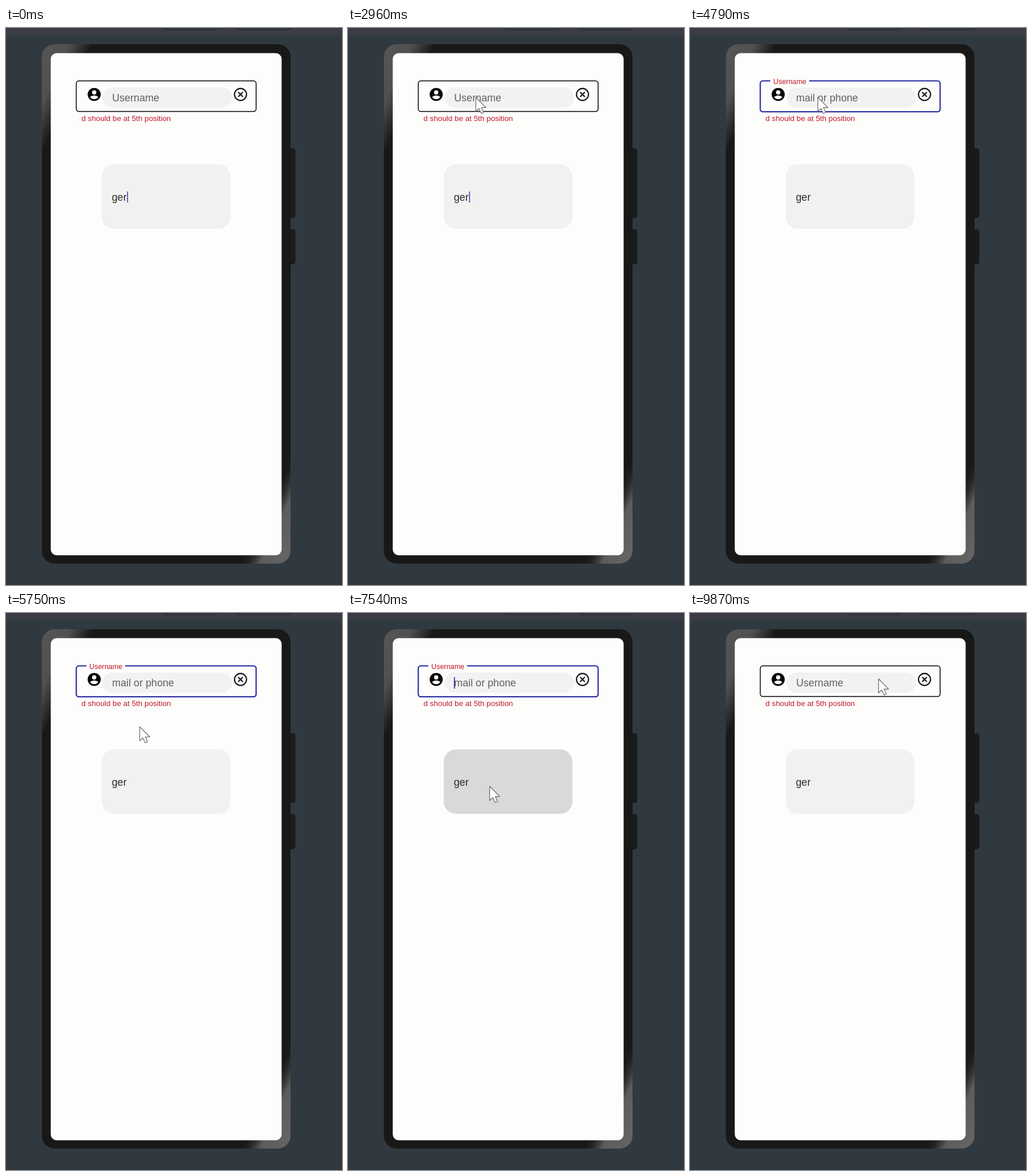
Recreate the animation shown at these times as an HTML page. Size 581 px wide and 964 px high, loop 9910 ms.

```html
<!DOCTYPE html>
<html lang="en">
<head>
<meta charset="utf-8">
<title>Text field focus</title>
<style>
  html, body { margin: 0; width: 100%; height: 100%; overflow: hidden; background: #30393f; }
  svg { display: block; }
  text { font-family: "Liberation Sans", Arial, sans-serif; font-size: 17.7px; }
  .error { font-size: 13.25px; fill: #c01828; }
  .label { font-size: 12.4px; fill: #c01828; }
  .hint { fill: #606060; }
</style>
</head>
<body>
<svg width="581" height="964" viewBox="0 0 581 964">
  <defs>
    <linearGradient id="shineTop" gradientUnits="userSpaceOnUse" x1="62" y1="28" x2="134.5" y2="61.6">
      <stop offset="0" stop-color="#565656"/>
      <stop offset=".55" stop-color="#505050"/>
      <stop offset="1" stop-color="#181818"/>
    </linearGradient>
    <linearGradient id="shineBottom" gradientUnits="userSpaceOnUse" x1="492" y1="927" x2="419.5" y2="893.4">
      <stop offset="0" stop-color="#666"/>
      <stop offset=".6" stop-color="#5c5c5c"/>
      <stop offset="1" stop-color="#181818" stop-opacity="0"/>
    </linearGradient>
  </defs>

  <rect width="581" height="964" fill="#30393f"/>
  <rect width="581" height="12.5" fill="#3b3d46"/>
  <g fill="#373b42" stroke="#292d32" stroke-width="1.5">
    <rect x="270" y="-20" width="97" height="23" rx="7"/>
    <rect x="397" y="-20" width="97" height="23" rx="7"/>
  </g>

  <!-- phone -->
  <g fill="#191b1c">
    <rect x="484" y="208" width="16.5" height="121" rx="5"/>
    <rect x="484" y="348" width="16.5" height="61" rx="5"/>
  </g>
  <rect x="62" y="28" width="430" height="899" rx="22" fill="url(#shineTop)"/>
  <rect x="62" y="28" width="430" height="899" rx="22" fill="url(#shineBottom)"/>
  <rect x="77.4" y="43.6" width="399.2" height="868.9" rx="10" fill="#fdfdfc"/>

  <!-- user name field -->
  <rect x="167" y="103" width="224" height="35" rx="17.5" fill="#f2f2f2"/>
  <g id="idle">
    <rect x="121.5" y="91.5" width="311" height="53" rx="4.5" fill="none" stroke="#000" stroke-width="1.5"/>
    <text class="hint" x="183.5" y="127">Username</text>
  </g>
  <g id="focused">
    <path d="M139 91.5H126a4.5 4.5 0 0 0-4.5 4.5v44.5a4.5 4.5 0 0 0 4.5 4.5h302a4.5 4.5 0 0 0 4.5-4.5V96a4.5 4.5 0 0 0-4.5-4.5H206"
      fill="none" stroke="#2226a0" stroke-width="2.1"/>
    <text class="label" x="144" y="97">Username</text>
    <text class="hint" x="183.5" y="127">mail or phone</text>
  </g>
  <circle cx="152.5" cy="115" r="11.3" fill="#050505"/>
  <circle cx="152.5" cy="111.5" r="3.7" fill="#fff"/>
  <path d="M145.3 119.6Q148 116.8 152.5 116.8T159.7 119.6Q157 123.3 152.5 123.3T145.3 119.6Z" fill="#fff"/>
  <g fill="none" stroke="#111" stroke-width="2.1">
    <circle cx="405.5" cy="115" r="10.4"/>
    <path d="M401.500 111l8 8m0-8l-8 8"/>
  </g>
  <text class="error" x="130.5" y="161">d should be at 5th position</text>
  <rect id="nameCaret" x="183.2" y="111" width="1.7" height="20" fill="#2b2f9e"/>

  <!-- text area -->
  <rect id="area" x="165.5" y="236" width="222.5" height="111.5" rx="21"/>
  <text x="183" y="299" fill="#2a2a2a">ger</text>
  <rect id="areaCaret" x="209.5" y="283" width="1.5" height="19" fill="#3a3fae"/>

  <path id="pointer" d="M0 0V24.5L5.4 19.4L9.500 28L13.600 26.200L9.800 17.700H17.400Z" fill="#fff" stroke="#666" stroke-width="1.2" stroke-linejoin="round"/>
</svg>
<script>
const LOOP = 9910;
const FOCUS = [3710, 7640];
const PRESS = [7420, 7640];
const NAME_CARET = [[3710, 4350], [4910, 5540], [6080, 6710], [7260, 7640]];
const AREA_CARET = [[0, 80], [620, 1270], [1850, 2520], [2950, 3710], [7640, 8330], [8950, 9640]];
// time, x, y
const POINTER = [
  [300, 590, 260], [1250, 221, 120], [5300, 221, 120], [6300, 245, 300],
  [8100, 245, 300], [8620, 302, 155], [9250, 326, 114]
];

const el = id => document.getElementById(id);
const within = (t, [from, to]) => t >= from && t < to;
const clamp = v => Math.min(1, Math.max(0, v));
const ease = v => v * v * (3 - 2 * v);
const show = (id, on) => el(id).setAttribute("visibility", on ? "visible" : "hidden");

function pointerAt(t) {
  const next = POINTER.findIndex(p => p[0] > t);
  if (next < 0) return POINTER.at(-1).slice(1);
  const a = POINTER[Math.max(0, next - 1)], b = POINTER[next];
  const k = ease(clamp((t - a[0]) / (b[0] - a[0] || 1)));
  return [a[1] + (b[1] - a[1]) * k, a[2] + (b[2] - a[2]) * k];
}

function draw(t) {
  const focused = within(t, FOCUS);
  show("focused", focused);
  show("idle", !focused);
  show("nameCaret", NAME_CARET.some(span => within(t, span)));
  show("areaCaret", AREA_CARET.some(span => within(t, span)));

  const press = clamp((t - PRESS[0]) / 100) * clamp((PRESS[1] + 100 - t) / 100);
  const grey = Math.round(241 - 24 * press);
  el("area").setAttribute("fill", `rgb(${grey},${grey},${grey})`);

  show("pointer", t >= POINTER[0][0]);
  el("pointer").setAttribute("transform", `translate(${pointerAt(t)})`);
}

const start = performance.now();
function tick() {
  draw((performance.now() - start) % LOOP);
  requestAnimationFrame(tick);
}
tick();
</script>
</body>
</html>
```
